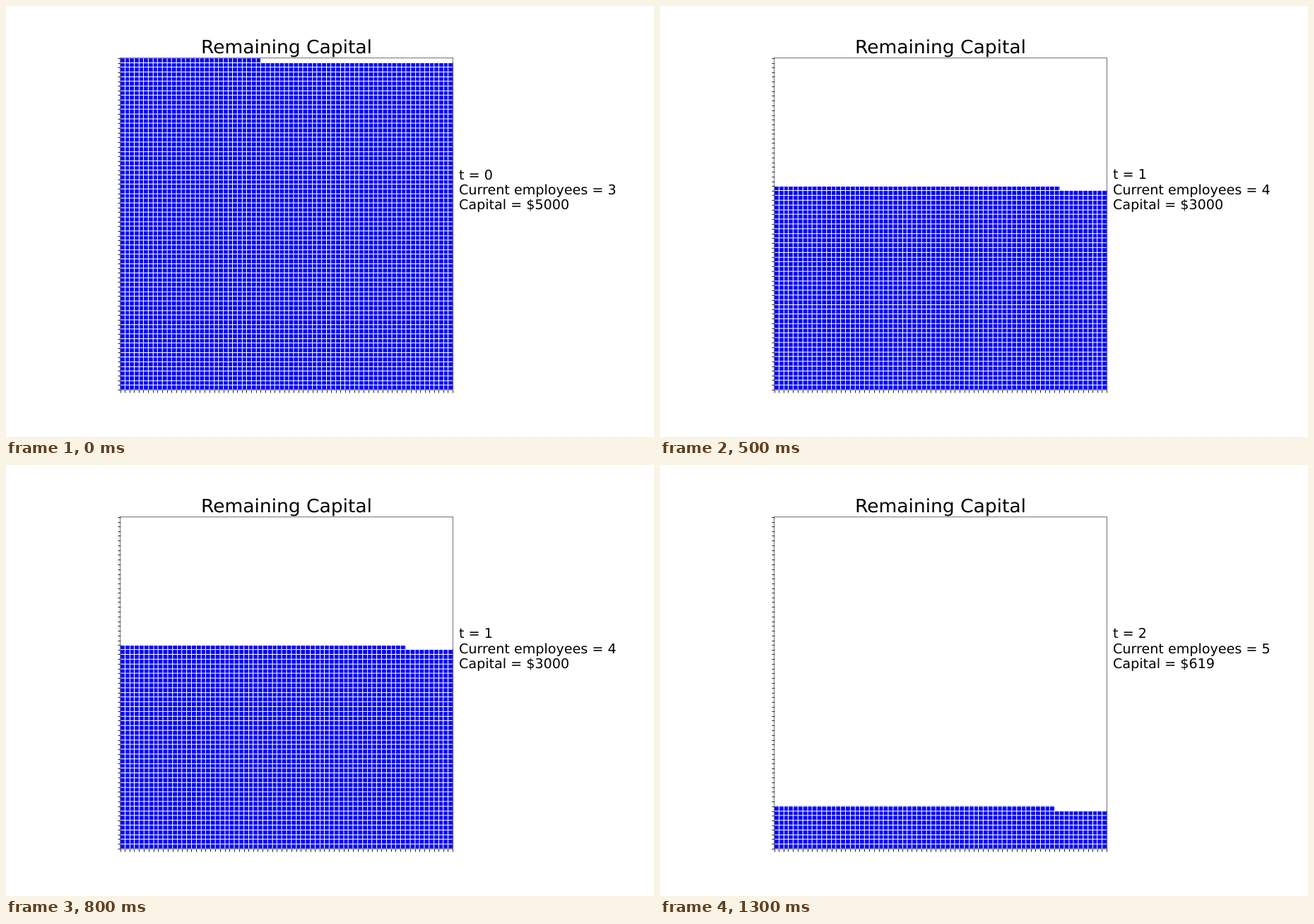
These frames come from a looping animation (917 px wide and 611 px high, 1.5 s). A matplotlib script:

```python
import numpy as np
import matplotlib.pyplot as plt
from matplotlib.animation import FuncAnimation
from matplotlib.colors import ListedColormap

DPI = 76.4
WIDTH, HEIGHT = 917, 611
CMAP = ListedColormap(["white", "blue"])

# Layout grid on which the axes and the cell edges sit
GRID_W, GRID_H = 1200, 800
SIDE = 616

# (employees, capital, cells per side)
STEPS = [(3, 5000, 71), (4, 3000, 70), (5, 619, 70)]

plt.rcParams["font.family"] = "DejaVu Sans"
plt.rcParams["text.hinting"] = "none"
fig = plt.figure(figsize=((WIDTH + 1e-6) / DPI, (HEIGHT + 1e-6) / DPI),
                 dpi=DPI, facecolor="white")
ax = fig.add_axes([211.5 / GRID_W, 87.5 / GRID_H, SIDE / GRID_W, SIDE / GRID_H])


def draw(t):
    employees, capital, n = STEPS[t]
    ax.clear()
    cells = (np.arange(n * n) < capital).reshape(n, n)
    ax.imshow(cells, cmap=CMAP, vmin=0, vmax=1, origin="lower",
              interpolation="nearest", aspect="auto")

    edges = np.round(np.arange(n + 1) * SIDE / n) * n / SIDE - 0.5
    ax.set_xticks(edges)
    ax.set_yticks(edges)
    ax.tick_params(labelbottom=False, labelleft=False)
    ax.grid(color="white", linewidth=1)
    plt.setp(ax.get_xgridlines() + ax.get_ygridlines(), snap=False)
    plt.setp(list(ax.spines.values()), color="#555560", snap=False)

    ax.set_title("Remaining Capital", fontsize=25)
    ax.text(1.019, 0.601,
            f"t = {t}\nCurrent employees = {employees}\nCapital = ${capital}",
            transform=ax.transAxes, fontsize=18, va="center")
    return []


anim = FuncAnimation(fig, draw, frames=len(STEPS), init_func=lambda: draw(0),
                     interval=500, repeat=True, repeat_delay=0, blit=False)
plt.show()
```
